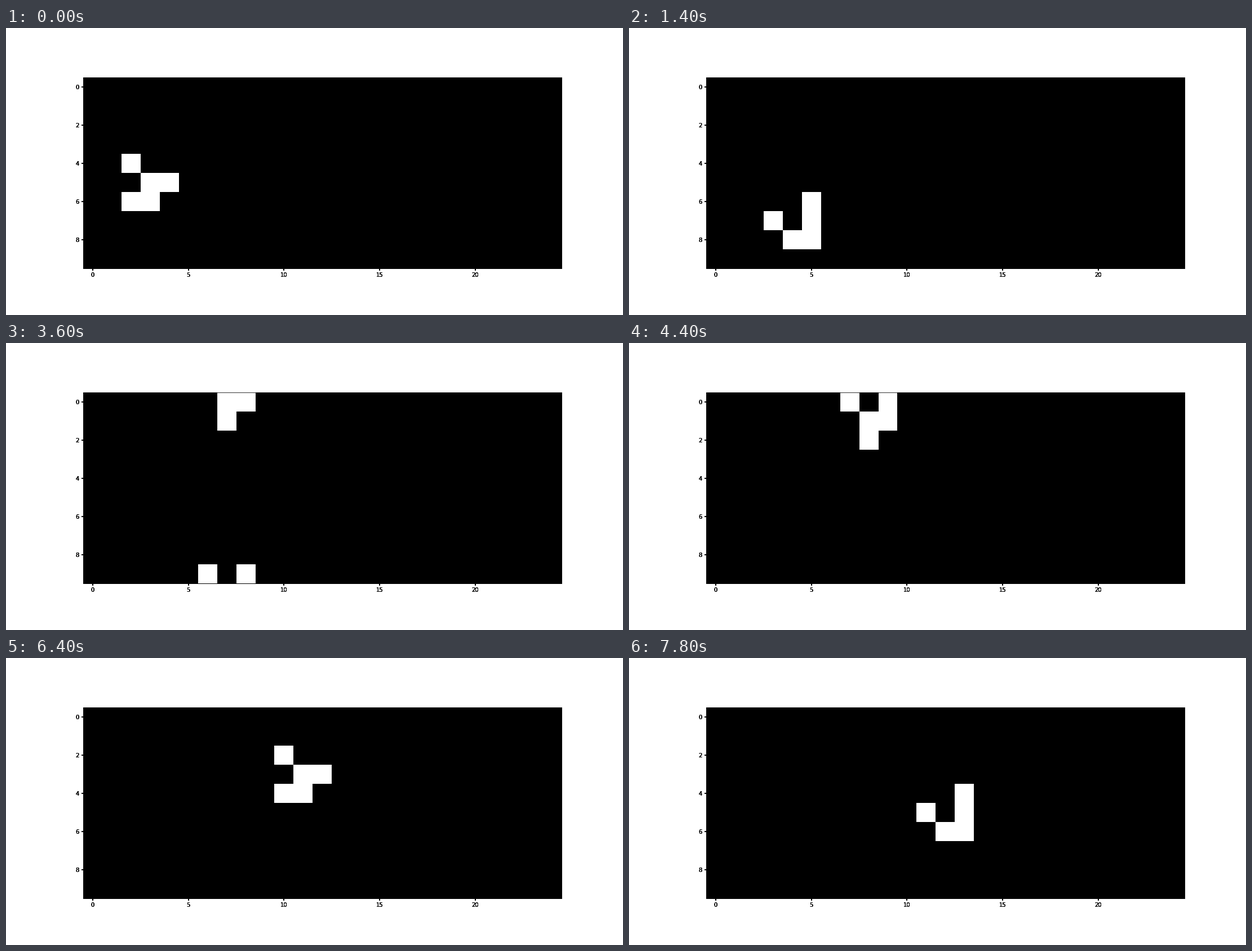
Recreate the animation shown at these times as a matplotlib script. Size 1095 px wide and 511 px high, loop 8000 ms.

```python
import numpy as np
import matplotlib.pyplot as plt
from matplotlib.animation import FuncAnimation

W, H, DPI = 1095, 511, 72
ROWS, COLS = 10, 25
STEPS, INTERVAL = 40, 200
GLIDER = [(4, 2), (5, 3), (5, 4), (6, 2), (6, 3)]
LAYERS = 4  # stacked axes make labels and ticks dark and crisp


def step(grid):
    """One Game of Life generation on a torus."""
    near = sum(np.roll(grid, (dy, dx), (0, 1))
               for dy in (-1, 0, 1) for dx in (-1, 0, 1) if dy or dx)
    return ((near == 3) | ((grid == 1) & (near == 2))).astype(int)


def run(grid, count):
    history = [grid]
    while len(history) < count:
        history.append(step(history[-1]))
    return history


def add_board(fig, grid):
    ax = fig.add_subplot()
    image = ax.imshow(grid, cmap="gray", vmin=0, vmax=1)
    ax.set_xticks(range(0, COLS, 5))
    ax.set_yticks(range(0, ROWS, 2))
    ax.tick_params(width=1.5)
    return image


start = np.zeros((ROWS, COLS), dtype=int)
start[tuple(zip(*GLIDER))] = 1
history = run(start, STEPS)

plt.rcParams["font.family"] = "DejaVu Sans"
plt.rcParams["font.size"] = 10
fig = plt.figure(figsize=(W / DPI, H / DPI), dpi=DPI, facecolor="white")
boards = [add_board(fig, start) for _ in range(LAYERS)]


def update(i):
    for board in boards:
        board.set_data(history[i])
    return boards


anim = FuncAnimation(fig, update, frames=STEPS, interval=INTERVAL,
                     repeat=True, repeat_delay=0, blit=False)
plt.show()
```
